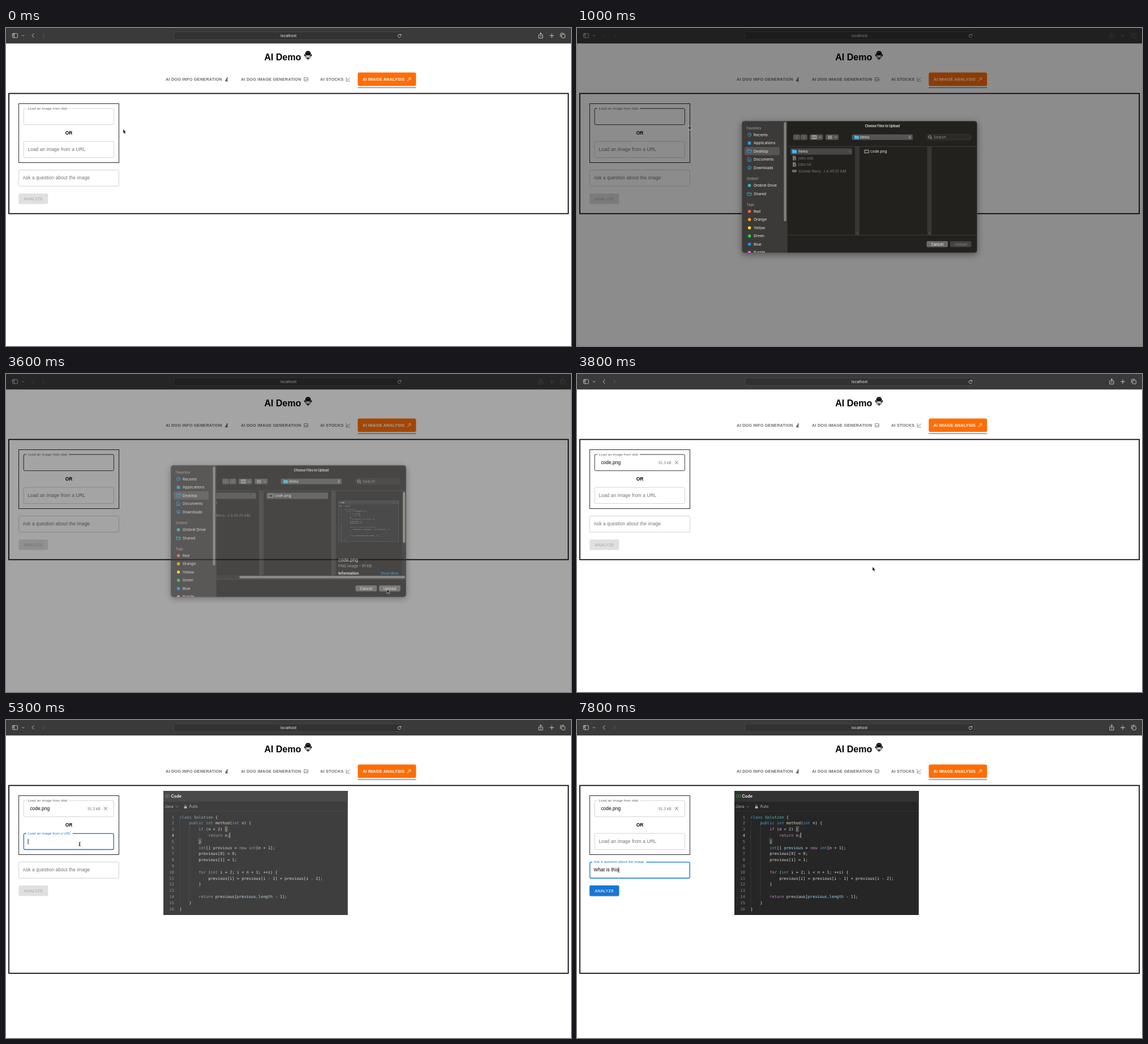
An HTML page for the animation above (8 s loop, 998 px wide and 561 px high).

```html
<!DOCTYPE html>
<html lang="en">
<head>
<meta charset="utf-8">
<title>AI Demo</title>
<style>
html, body { margin: 0; width: 100%; height: 100%; overflow: hidden; background: #fff; }
svg { display: block; width: 100vw; height: 100vh; }
text { white-space: pre; font-family: "Liberation Sans", Arial, sans-serif; font-size: 8.32px; letter-spacing: .078px; }
.ui text { font-family: Inter, sans-serif; font-size: 6.6px; letter-spacing: 0; }
.mono text { font-family: "DejaVu Sans Mono", monospace; font-size: 7px; letter-spacing: 0; }
.tabs text { font-size: 7.28px; font-weight: 700; letter-spacing: .208px; fill: #6b6b6b; }
.line { fill: none; stroke-linecap: round; stroke-linejoin: round; }
.field { fill: none; stroke-width: .8; stroke: #c6c6c6; }
.dark { stroke: #222; }
.blue { stroke: #1976d2; stroke-width: 1.3; }
.head { font-weight: 600; fill: #8f8e8c; }
.ui .head { font-size: 5.8px; }

.loop { animation: 8s linear infinite; }
#pointer { animation-name: pointer; }
@keyframes pointer {
  0%, .6% { transform: translate(207px, 178.5px); animation-timing-function: ease-in-out; }
  7.5%, 10.2% { transform: translate(162px, 159.5px); animation-timing-function: ease-in-out; }
  20% { transform: translate(470px, 268px); animation-timing-function: ease-out; }
  26.25%, 30.6% { transform: translate(530px, 221.5px); animation-timing-function: ease-in-out; }
  41.25%, 45% { transform: translate(673.5px, 379.5px); }
  47.5% { transform: translate(522px, 340px); }
  52.5% { transform: translate(480px, 326px); animation-timing-function: ease-in-out; }
  63.75%, 67.5% { transform: translate(130px, 219px); animation-timing-function: ease-in-out; }
  75%, 100% { transform: translate(112px, 266px); }
}
#sheet { animation-name: sheet; }
@keyframes sheet {
  0%, 9% { transform: translateY(-19px); opacity: 0; }
  10% { transform: translateY(-15px); opacity: .39; }
  11.25% { transform: translateY(-4px); opacity: .82; }
  12.5%, 43.2% { transform: translateY(0); opacity: 1; }
  45% { transform: translateY(-3px); opacity: .72; }
  46.25% { transform: translateY(-14px); opacity: .3; }
  47%, 100% { transform: translateY(-19px); opacity: 0; }
}
#shade { animation-name: shade; }
@keyframes shade {
  0%, 9% { opacity: 0; }
  10% { opacity: .1; }
  11.25% { opacity: .32; }
  13%, 43.2% { opacity: .5; }
  45% { opacity: .36; }
  46.25% { opacity: .12; }
  47%, 100% { opacity: 0; }
}
#nav { animation-name: nav; animation-timing-function: step-end; }
@keyframes nav { 0% { opacity: 1; } 9.5% { opacity: .25; } 46.5%, 100% { opacity: 1; } }
#columns { animation-name: columns; }
@keyframes columns {
  0%, 31% { transform: none; animation-timing-function: ease-out; }
  34%, 100% { transform: translateX(-44px); }
}
#panel { animation-name: panel; animation-timing-function: step-end; }
@keyframes panel { 0% { height: 212px; } 48.125%, 100% { height: 331.3px; } }
#photo { animation-name: appear, materialize; animation-timing-function: cubic-bezier(.7, 0, .6, 1); }
@keyframes appear { 0%, 48.125% { opacity: 0; } 66.875%, 100% { opacity: 1; } }
@keyframes materialize {
  0%, 48.125% { filter: saturate(.2) contrast(.5) brightness(1.2); }
  76.25% { filter: saturate(.6) contrast(1) brightness(1); }
  85.625%, 100% { filter: saturate(1) contrast(1) brightness(1); }
}
#urlLabel { animation-name: urlLabel; animation-timing-function: cubic-bezier(0, 0, .2, 1); }
@keyframes urlLabel {
  0%, 63.75%, 80%, 100% { transform: translate(38.5px, 216.8px); fill: #737373; }
  66.25%, 77.5% { transform: translate(38.5px, 201.6px) scale(.75); fill: #1976d2; }
}
#askLabel { animation-name: askLabel; animation-timing-function: cubic-bezier(0, 0, .2, 1); }
@keyframes askLabel {
  0%, 77.5% { transform: translate(29.5px, 267.2px); fill: #737373; }
  80%, 100% { transform: translate(29.5px, 252.1px) scale(.75); fill: #1976d2; }
}
#button { animation-name: button; }
@keyframes button {
  0%, 87.5% { fill: #e0e0e0; filter: drop-shadow(0 .8px .8px #0000); }
  90.6%, 100% { fill: #1976d2; filter: drop-shadow(0 .8px .8px #0006); }
}
#buttonText { animation-name: buttonText; font-size: 7.28px; letter-spacing: .208px; }
@keyframes buttonText { 0%, 87.5% { fill: #a8a8a8; } 90.6%, 100% { fill: #fff; } }
</style>
</head>
<body>
<svg viewBox="0 0 998 561" preserveAspectRatio="none">
  <defs>
    <clipPath id="sheetClip"><rect x="291" y="164" width="416" height="232.7" rx="5"/></clipPath>
    <clipPath id="listClip"><rect x="371.5" y="209" width="335" height="156"/></clipPath>
    <g id="folder"><path d="M0 .8q0-.8.8-.8h2l.8 1h3.6q.8 0 .8.8v4q0 .8-.8.8H.8q-.8 0-.8-.8z" fill="#3fb2ea"/><path d="M0 2.2h8" stroke="#8ad6f8" stroke-width=".6"/></g>
    <g id="doc"><path d="M0 0h4l2 2v6H0z" fill="#777674"/><path d="M1.2 3.5h3.6M1.2 5h3.6M1.2 6.4h3.6" stroke="#44433f" stroke-width=".5"/></g>
  </defs>

  <!-- browser bar -->
  <g class="ui">
    <rect width="998" height="27.3" fill="#3a3a3a"/>
    <rect x="296.5" y="6.8" width="405" height="13.6" rx="3.2" fill="#323232" stroke="#4d4d4d" stroke-width=".8"/>
    <text x="499" y="16.1" text-anchor="middle" fill="#f2f2f2">localhost</text>
    <g class="line" stroke="#c4c4c4" stroke-width=".9">
      <rect x="11.3" y="9.8" width="9.2" height="7.2" rx="1.2"/><path d="M14.4 9.8v7.2M12.4 11.6h.9M12.4 13.2h.9"/>
      <path d="M28.4 12.6l1.8 1.8 1.8-1.8"/>
      <path d="M697.6 12.4a2.9 2.9 0 1 0 .4 2M697.8 10.4v2.2h-2.2"/>
      <path d="M64.8 10l3.2 3.4-3.2 3.4" stroke="#666"/>
    </g>
    <g id="nav" class="loop line" stroke="#c4c4c4" stroke-width="1">
      <path d="M49.2 10l-3.2 3.4 3.2 3.4M964 10v7M960.5 13.5h7"/>
      <path d="M942.6 12.2h-1.6v5.6h7v-5.6h-1.6M944.5 15v-6.4M942.8 10.2l1.7-1.8 1.7 1.8"/>
      <rect x="981.4" y="11.4" width="6" height="6" rx="1"/><path d="M979.4 15.4v-5q0-1 1-1h5"/>
    </g>
  </g>

  <!-- page header -->
  <text x="456.3" y="56.8" style="font-size:16px;font-weight:700;letter-spacing:0">AI Demo</text>
  <g>
    <path d="M528.5 45.5q.5-5 5-5t5 5l-1.4 1.4h-7.2z"/>
    <ellipse cx="527.8" cy="48" rx="1" ry="2"/><ellipse cx="539.2" cy="48" rx="1" ry="2"/>
    <path d="M529.4 47.5h8.2v4.5l-4.1 4-4.1-4z" fill="#fff" stroke="#000" stroke-width=".9"/>
    <circle cx="531.7" cy="49.5" r=".9"/><circle cx="535.3" cy="49.5" r=".9"/>
    <path d="M530.6 52h5.8l-2.9 2.8z"/><path d="M531 43.5h1.6M534.4 43.5h1.6" stroke="#fff" stroke-width=".8"/>
  </g>
  <g class="tabs">
    <text x="282" y="93">AI DOG INFO GENERATION</text>
    <path d="M387 94q0-3 2.4-4.4l.4-2.2 1.6-.4.9 1.2-1 1v4.2h1v.8h-5.3z" fill="#6b6b6b"/>
    <text x="415" y="93">AI DOG IMAGE GENERATION</text>
    <g class="line" stroke="#6b6b6b" stroke-width=".8">
      <rect x="526.5" y="87.6" width="6.8" height="5.8" rx=".7"/><path d="M527 92.4l2-2 1.3 1.2 1.5-1.7 1.4 1.8"/>
      <path d="M601 87.2v6.6h6.4M602.4 91.6l1.6-1.8 1.2 1 2-2.8"/>
    </g>
    <text x="555" y="93">AI STOCKS</text>
    <rect x="621.3" y="78.6" width="103" height="23.6" rx="3" fill="#ff6d05"/>
    <rect x="621.3" y="104.6" width="103" height="1.1" fill="#1976d2"/>
    <text x="629.7" y="93" style="fill:#fff">AI IMAGE ANALYSIS</text>
    <path class="line" d="M709.2 93.6l3-3.4M711.4 88.4l3 2.8M712.2 87.4l2.4.2.4 2.4" stroke="#fff" stroke-width="1"/>
  </g>

  <rect id="panel" class="loop" x="5" y="115.5" width="988.2" height="212" fill="none" stroke="#000" stroke-width="1.7"/>

  <!-- form -->
  <rect x="22.6" y="133.5" width="176.8" height="104" fill="none" stroke="#111" stroke-width=".9"/>
  <rect class="field" x="31.2" y="142" width="159.2" height="28.6" rx="2"/>
  <rect class="field dark" data-on="500-5100" x="31.2" y="142" width="159.2" height="28.6" rx="2"/>
  <rect x="36" y="140.5" width="75" height="3" fill="#fff"/>
  <text x="38.5" y="143.7" fill="#666" style="font-size:6.24px">Load an image from disk</text>
  <g data-on="3780-8000">
    <text x="42.4" y="158.9">code.png</text>
    <text x="144" y="158.6" fill="#777" style="font-size:6.7px;letter-spacing:0">91.3 kB</text>
    <path class="line" d="M173.1 153.4l5.4 5.4m0-5.4l-5.4 5.4" stroke="#555" stroke-width=".8"/>
  </g>
  <text x="111" y="188" text-anchor="middle" font-weight="700">OR</text>

  <rect class="field" x="31.2" y="200" width="159.2" height="28.6" rx="2"/>
  <rect class="field dark" data-on="4950-5100" x="31.2" y="200" width="159.2" height="28.6" rx="2"/>
  <g data-on="5100-6200">
    <rect class="field blue" x="31.4" y="200.3" width="158.8" height="28.2" rx="2"/>
    <rect x="36" y="198.5" width="82" height="3" fill="#fff"/>
    <rect id="urlCaret" x="38.6" y="209.8" width=".9" height="9.6"/>
  </g>
  <text id="urlLabel" class="loop">Load an image from a URL</text>

  <rect class="field" x="22.6" y="250.5" width="176.8" height="28.6" rx="2"/>
  <rect class="field dark" data-on="5950-6200" x="22.6" y="250.5" width="176.8" height="28.6" rx="2"/>
  <g data-on="6200-8000">
    <rect class="field blue" x="22.8" y="250.8" width="176.4" height="28.2" rx="2"/>
    <rect x="27" y="249" width="95" height="3" fill="#fff"/>
    <text id="typed" x="29.5" y="267.2"></text>
    <rect id="askCaret" y="260" width=".9" height="9.6"/>
  </g>
  <text id="askLabel" class="loop">Ask a question about the image</text>

  <rect id="button" class="loop" x="22.3" y="292" width="51.9" height="18.6" rx="2"/>
  <text id="buttonText" class="loop" x="48.3" y="304" text-anchor="middle">ANALYZE</text>

  <!-- loaded picture -->
  <g id="photo" class="loop">
    <g id="code">
      <rect x="278" y="125" width="325.7" height="219" fill="#262626"/>
      <rect x="278" y="125" width="325.7" height="19" fill="#333"/>
      <path d="M278 160.8h325.7" stroke="#363636" stroke-width=".8"/>
      <g class="ui">
        <path class="line" d="M283 131.8l-2.3 2.4 2.3 2.4M287.3 131.8l2.3 2.4-2.3 2.4M285.8 131.2l-1.3 6" stroke="#1fae4b" stroke-width=".9"/>
        <text x="291.5" y="137" fill="#fff" style="font-size:7.2px;font-weight:600">Code</text>
        <text x="280" y="155.2" fill="#b4b4b4" style="font-size:7px">Java</text>
        <path class="line" d="M299.4 151.8l2.3 2.2 2.3-2.2" stroke="#999" stroke-width=".7"/>
        <rect x="314.6" y="152.4" width="4.8" height="3.6" rx=".6" fill="#b4b4b4"/>
        <path class="line" d="M315.6 152.4v-1a1.4 1.4 0 0 1 2.8 0v1" stroke="#b4b4b4" stroke-width=".7"/>
        <text x="323.3" y="155.2" fill="#b4b4b4" style="font-size:7px">Auto</text>
      </g>
      <path d="M307 177v151M323.9 187.8v129M340.7 198.6v10" stroke="#444" stroke-width=".6"/>
      <path d="M387 187.8h4.4v9h-4.4zM340.2 209.4h4.4v9h-4.4z" fill="#3a3a3a" stroke="#888" stroke-width=".5"/>
      <g id="lines" class="mono"></g>
      <rect x="394.8" y="198.6" width=".9" height="9.4" fill="#ddd"/>
    </g>
  </g>

  <rect id="shade" class="loop" width="998" height="561"/>

  <!-- file chooser -->
  <g id="sheet" class="loop ui" style="filter:drop-shadow(0 3px 6px #0006)">
    <g clip-path="url(#sheetClip)">
      <rect x="291" y="164" width="416" height="233" fill="#22211e"/>
      <rect x="291" y="164" width="80.6" height="233" fill="#3b3a38"/>
      <rect x="296" y="210" width="62" height="14.4" rx="3" fill="#565553"/>
      <rect x="365.4" y="166" width="4.2" height="175" rx="2.1" fill="#82817f"/>
      <g id="side"></g>
      <g class="line" stroke="#2aa0e0" stroke-width=".8">
        <circle cx="304.5" cy="188.3" r="3.2"/><path d="M304.5 186.3v2.2h1.6"/>
        <rect x="301" y="214.4" width="7.2" height="5.4" rx=".8"/><path d="M301 216h7.2"/>
        <path d="M302 228.4h3.2l2 2v5h-5.2zM303.2 232.2h2.8M303.2 233.8h2.8"/>
        <circle cx="304.5" cy="246.4" r="3.2"/><path d="M304.5 244.6v3.4M303 246.8l1.5 1.5 1.5-1.5"/>
        <path d="M301 295v-5h2.6l.8.9h3.6v4.1zM301 292h7" stroke="#2cb8c8"/>
      </g>
      <rect x="301.8" y="200.2" width="5.4" height="5.4" fill="#2aa0e0"/>
      <circle cx="304.5" cy="277.8" r="2.8" fill="#2cb8c8"/>

      <text x="539.3" y="175.2" text-anchor="middle" fill="#f0f0f0" style="font-size:5.5px;font-weight:600">Choose Files to Upload</text>
      <g fill="#555452">
        <rect x="382" y="187.8" width="12" height="9.8" rx="2"/><rect x="394.7" y="187.8" width="12" height="9.8" rx="2"/>
        <rect x="411" y="187.8" width="23.5" height="9.8" rx="2"/><rect x="439" y="187.8" width="23.2" height="9.8" rx="2"/>
        <rect x="485.5" y="187.8" width="107.6" height="9.8" rx="2"/>
      </g>
      <g class="line" stroke="#8a8987" stroke-width=".8"><path d="M388.8 190.5l-2 2.2 2 2.2M399.8 190.5l2 2.2-2 2.2"/></g>
      <g class="line" stroke="#d8d8d6" stroke-width=".8">
        <rect x="415.4" y="190" width="8" height="5.4" rx=".6"/><path d="M418 190v5.4M420.8 190v5.4M428 192l1.5 1.6 1.5-1.6M455.6 192l1.5 1.6 1.5-1.6"/>
        <path d="M443.6 190.6h6.6M443.6 192.7h6.6M443.6 194.8h6.6" stroke-dasharray="1.6 .9" stroke-linecap="butt" stroke-width="1.3"/>
      </g>
      <use href="#folder" x="490" y="189.4"/>
      <text x="500" y="195.1" fill="#f0f0f0">items</text>
      <rect data-on="1100-3400" x="583.6" y="188.5" width="8.4" height="8.4" rx="1.8" fill="#0a5fe0"/>
      <path class="line" d="M586.4 191.8l1.4-1.4 1.4 1.4M586.4 193.6l1.4 1.4 1.4-1.4" stroke="#fff" stroke-width=".7"/>
      <rect x="617.4" y="187.8" width="78.4" height="9.8" rx="2" fill="#2b2a27" stroke="#444340" stroke-width=".6"/>
      <path class="line" d="M625.2 194l1.8 1.8M621 192.3a2.4 2.4 0 1 0 4.8 0a2.4 2.4 0 1 0-4.8 0" stroke="#c8c8c6" stroke-width=".8"/>
      <text x="630" y="195.1" fill="#8f8e8c">Search</text>
      <path d="M371.6 209h335.4M371.6 365.4h335.4" stroke="#454441" stroke-width=".8"/>

      <g clip-path="url(#listClip)">
        <g id="columns" class="loop">
          <path d="M495 209v157M622.5 209v157" stroke="#373634" stroke-width="8"/>
          <path d="M494 359.6v4M496 359.6v4M621.5 359.6v4M623.5 359.6v4" stroke="#6b6a68" stroke-width=".6"/>
          <rect x="377" y="212.2" width="109" height="11.4" rx="2.2" fill="#474644"/>
          <rect data-on="1100-2300" x="377" y="212.2" width="109" height="11.4" rx="2.2" fill="#0a58d8"/>
          <use href="#folder" x="380" y="214.6"/>
          <text x="391" y="220.3" fill="#f0f0f0">items</text>
          <path class="line" d="M481 216.4l1.3 1.5-1.3 1.5" stroke="#9a9997" stroke-width=".7"/>
          <use href="#doc" x="381" y="225.4"/><use href="#doc" x="381" y="236.8"/>
          <rect x="380" y="250" width="8" height="4.4" rx=".5" fill="#6c6b69"/>
          <g fill="#7d7c7a">
            <text x="391" y="231.8">jobs.ods</text><text x="391" y="243.2">jobs.txt</text>
            <text data-on="880-8000" x="391" y="254.7">Screen Reco...t 4.45.01 AM</text>
          </g>
          <rect data-on="3400-3800" x="504" y="212.2" width="109" height="11.4" rx="2.2" fill="#52514f"/>
          <rect data-on="2300-3400" x="504" y="212.2" width="109" height="11.4" rx="2.2" fill="#0a58d8"/>
          <rect x="508" y="215.2" width="7.2" height="5.4" fill="#333" stroke="#e0e0de" stroke-width=".7"/>
          <text x="518" y="220.3" fill="#f0f0f0">code.png</text>
          <g data-on="2500-3800">
            <use href="#code" transform="translate(541 186.3) scale(.3257)"/>
            <rect x="631.5" y="227" width="106.1" height="71.3" fill="none" stroke="#555" stroke-width=".6"/>
            <text x="631" y="333.6" fill="#f0f0f0" style="font-size:7.8px">code.png</text>
            <text x="631" y="344.4" fill="#a5a4a2">PNG image - 91 KB</text>
            <text x="631" y="356.6" fill="#f0f0f0" style="font-size:6.4px;font-weight:700">Information</text>
            <text x="737.6" y="356.6" text-anchor="end" fill="#3b96f2" style="font-size:6px">Show More</text>
          </g>
        </g>
        <g data-on="2600-3800">
          <rect x="371.6" y="358" width="336" height="7" fill="#2b2a28"/><rect x="699.5" y="209" width="8" height="150" fill="#2b2a28"/>
          <g fill="#84837f"><rect x="412" y="359.3" width="293" height="4.2" rx="2.1"/><rect x="701" y="211" width="4.2" height="90" rx="2.1"/></g>
        </g>
      </g>

      <rect x="617.4" y="376" width="37.6" height="10.4" rx="2.2" fill="#6b6a68"/>
      <text x="636.2" y="383.5" text-anchor="middle" fill="#fff">Cancel</text>
      <rect x="659" y="376" width="37.6" height="10.4" rx="2.2" fill="#444341"/>
      <text x="677.8" y="383.5" text-anchor="middle" fill="#858482">Upload</text>
      <g data-on="2500-3800">
        <rect x="659" y="376" width="37.6" height="10.4" rx="2.2" fill="#6b6a68"/>
        <text x="677.8" y="383.5" text-anchor="middle" fill="#fff">Upload</text>
      </g>
    </g>
    <rect x="291.3" y="164.3" width="415.4" height="232.1" rx="5" fill="none" stroke="#63625f" stroke-width=".7"/>
  </g>

  <g id="pointer" class="loop">
    <path data-on="0-5050" d="M0 0v7.6l1.7-1.5 1.2 2.7 1.3-.6-1.2-2.6h2.2z" stroke="#fff" stroke-width=".6"/>
    <path data-on="5050-7000" class="line" d="M-1.6-3.4q1.6 0 1.6 1.2V2.2q0 1.2-1.6 1.2M1.6-3.4Q0-3.4 0-2.2V2.2q0 1.2 1.6 1.2M-1 .8h2" stroke="#222" stroke-width=".8"/>
  </g>
</svg>
<script>
const $ = id => document.getElementById(id);

function add(parent, tag, attrs, content = '') {
  const el = document.createElementNS('http://www.w3.org/2000/svg', tag);
  for (const k in attrs) el.setAttribute(k, attrs[k]);
  el.textContent = content;
  return parent.appendChild(el);
}

// Chooser sidebar
const side = $('side');
const sideText = (x, y, s, cls) => add(side, 'text', { x, y, fill: '#eeeeec', class: cls }, s);
['Recents', 'Applications', 'Desktop', 'Documents', 'Downloads']
  .forEach((s, i) => sideText(312, 190.6 + i * 14.55, s, ''));
sideText(312, 280.2, 'Ombrel Drive', '');
sideText(312, 294.7, 'Shared', '');
[['Favorites', 178.8], ['Ombrel', 268.2], ['Tags', 314]].forEach(([s, y]) => sideText(299.5, y, s, 'head'));
const tags = { Red: '#ff5f57', Orange: '#ffa311', Yellow: '#ffe11a', Green: '#1fd951', Blue: '#0fa0ff', Purple: '#e57cf5' };
Object.keys(tags).forEach((s, i) => {
  const y = 323.5 + i * 14.5;
  add(side, 'circle', { cx: 304.6, cy: y, r: 2.7, fill: tags[s] });
  sideText(312, y + 2.4, s, '');
});

// Highlighted code
const source = `class Solution {
    public int method(int n) {
        if (n < 2) {
            return n;
        }
        int[] previous = new int[n + 1];
        previous[0] = 0;
        previous[1] = 1;

        for (int i = 2; i < n + 1; ++i) {
            previous[i] = previous[i - 1] + previous[i - 2];
        }

        return previous[previous.length - 1];
    }
}`;
const rules = [
  [/^(class|public|int)$/, '#569cd6'],
  [/^(if|for|return|new)$/, '#c586c0'],
  [/^Solution$/, '#4ec9b0'],
  [/^method$/, '#dcdcaa'],
  [/^(previous(?=[ .])|length)/, '#9cdcfe'],
  [/^\d+$/, '#c9d8bd']
];
source.split('\n').forEach((line, i) => {
  const y = 173.5 + i * 10.8;
  add($('lines'), 'text', { x: 297, y, 'text-anchor': 'end', fill: i === 3 ? '#e0e0e0' : '#8a8a8a' }, i + 1);
  const row = add($('lines'), 'text', { x: 306.6, y });
  for (const m of line.matchAll(/\w+|\W+/g)) {
    const next = line[m.index + m[0].length] || '';
    const rule = rules.find(([re]) => re.test(m[0]) || (m[0] === 'previous' && re.test(m[0] + next)));
    add(row, 'tspan', { fill: rule ? rule[1] : '#dcdcdc' }, m[0]);
  }
});

// Hard switches and typing follow the clock of the CSS loop
const switches = [...document.querySelectorAll('[data-on]')]
  .map(el => [el, ...el.dataset.on.split('-').map(Number)]);
const message = 'What is this ';
const keyTimes = [7000, 7180, 7290, 7390, 7450, 7490, 7560, 7590, 7650, 7690, 7740, 7770, 7790];
const clock = $('pointer').getAnimations()[0];
const blink = (el, on) => el.setAttribute('opacity', on ? 1 : 0);

function draw() {
  const t = (clock.currentTime || 0) % 8000;
  for (const [el, from, to] of switches) el.style.display = t >= from && t < to ? '' : 'none';
  const text = message.slice(0, keyTimes.filter(k => k <= t).length);
  const typed = $('typed');
  if (typed.textContent !== text) typed.textContent = text;
  if (t >= 6200) $('askCaret').setAttribute('x', 29.5 + (text ? typed.getComputedTextLength() : 0));
  blink($('urlCaret'), (t - 5100) % 1000 < 500);
  blink($('askCaret'), t >= 7000 || (t - 6200) % 1000 < 500);
  requestAnimationFrame(draw);
}
draw();
</script>
</body>
</html>
```
